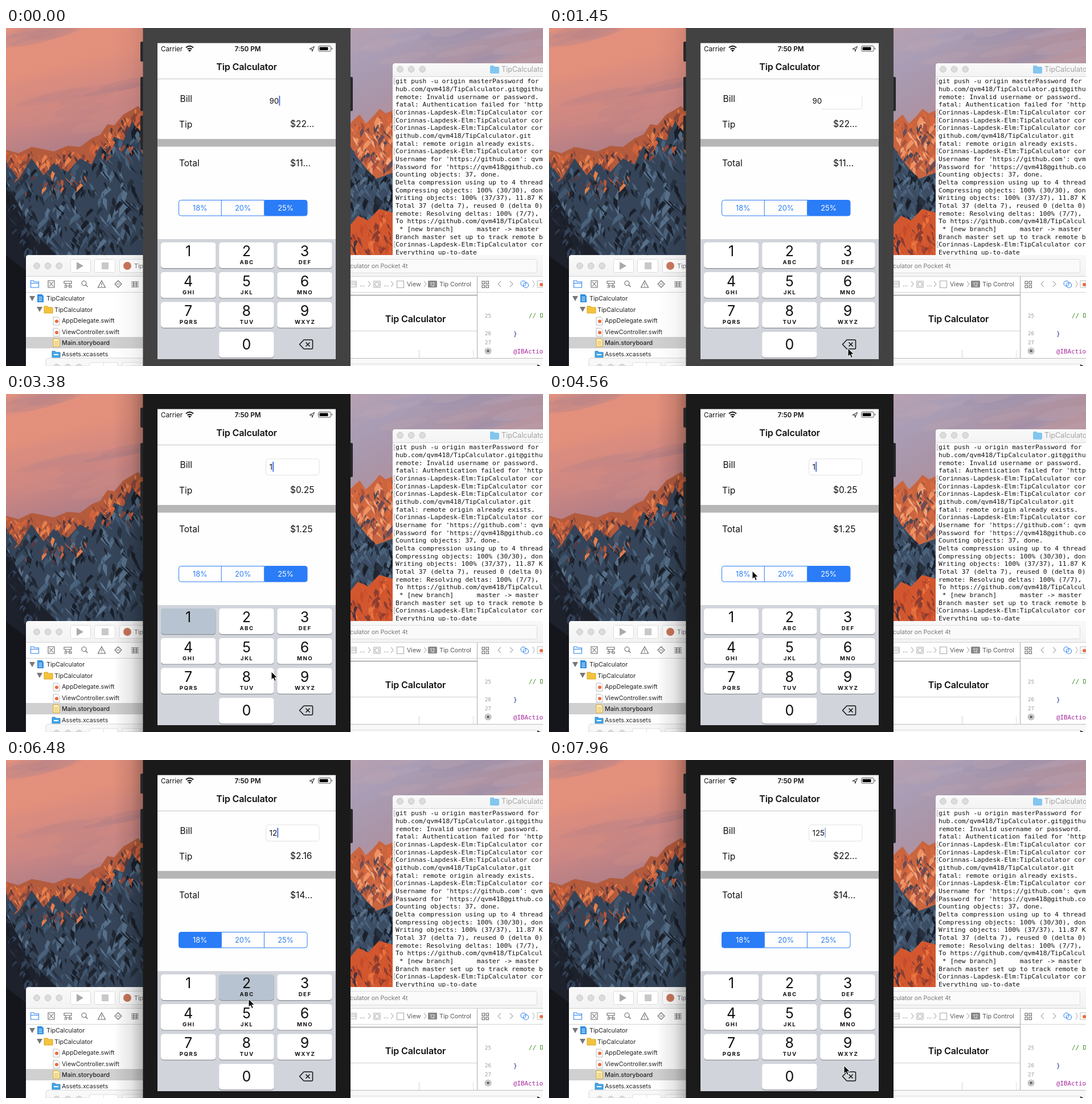
Animation, 943 px wide and 594 px high, one loop 8000 ms. Source, as an HTML page with a canvas:

```html
<!DOCTYPE html>
<html lang="en">
<head>
<meta charset="utf-8">
<title>Tip Calculator</title>
<style>
  html, body { margin: 0; width: 100%; height: 100%; overflow: hidden; background: #1c1e27; }
  canvas, svg { position: absolute; left: 0; top: 0; width: 943px; height: 594px; }
  text { font-family: Inter, "Open Sans", sans-serif; font-size: 15.5px; fill: #111; white-space: pre; }
  .mono { font-family: "DejaVu Sans Mono", monospace; font-size: 11.3px; }
  .code { font-size: 10.8px; }
  .ui { font-size: 10.7px; fill: #222; }
  .dim { fill: #777; }
  .mid { text-anchor: middle; }
  .title { font-size: 16px; font-weight: 600; letter-spacing: -.1px; }
  .status { font-size: 11.7px; }
  .field { font-size: 13.3px; }
  .digit { font-size: 25px; }
  .abc { font-size: 9.6px; font-weight: 700; letter-spacing: 1.5px; }
  .pct { font-size: 12.7px; fill: #2a7cf7; }
  .line { fill: none; stroke: #666; stroke-width: 1.1; }
  .box { fill: #fff; stroke: #dcdcdc; }
  .key { fill: #fff; }
  .key.down { fill: #b7c3d0; }
  .on rect { fill: #2a7cf7; }
  .on text { fill: #fff; }
  #del { fill: none; stroke: #111; stroke-width: 1.5; stroke-linejoin: round; }
  #del.down path:first-child { fill: #000; }
  #del.down path:last-child { stroke: #fff; }
</style>
</head>
<body>
<canvas id="wall" width="943" height="594"></canvas>
<svg viewBox="0 0 943 594">
  <defs>
    <linearGradient id="shade"><stop offset="0" stop-opacity="0"/><stop offset=".6" stop-opacity=".1"/><stop offset="1" stop-opacity=".28"/></linearGradient>
    <linearGradient id="bar" x2="0" y2="1"><stop stop-color="#f9f9f9"/><stop offset="1" stop-color="#f3f3f3"/></linearGradient>
    <clipPath id="part"><rect x="479" y="118" width="100" height="40"/></clipPath>
  </defs>

  <!-- terminal -->
  <path d="M679 400V67q0-5 5-5H943V400Z" fill="#fff"/>
  <path d="M679 85V67q0-5 5-5H943V85Z" fill="url(#bar)"/>
  <path d="M679 85.5H943" stroke="#d5d5d5"/>
  <path d="M850 68q0-2 2-2h4l2 2h6q2 0 2 2v8q0 2-2 2h-12q-2 0-2-2Z" fill="#82c6ef"/>
  <text x="870" y="77" style="font-size:12.6px;fill:#a3a3a3">TipCalculator</text>
  <g id="term"></g>

  <!-- editor window -->
  <path d="M35 594V404q0-5 5-5H943V594Z" fill="#fff"/>
  <path d="M35 437V404q0-5 5-5H943V437Z" fill="url(#bar)"/>
  <path d="M35 436.5H943M35 464.5H943" stroke="#d2d2d2"/>
  <g class="box">
    <rect x="113.500" y="406.500" width="35" height="23" rx="3"/>
    <rect x="155.500" y="406.500" width="36" height="23" rx="3"/>
    <rect x="199.500" y="406.500" width="60" height="23" rx="3"/>
    <rect x="560.500" y="406.500" width="372" height="24" rx="3" fill="#fafafa"/>
  </g>
  <path d="M124 411l12 7-12 7Z" fill="#aaa"/>
  <rect x="168" y="412" width="12" height="12" fill="#c8c8c8"/>
  <circle cx="213" cy="418" r="7" fill="#c9775a"/>
  <text class="ui dim" x="225" y="422">Tip</text>
  <text class="ui dim" x="604" y="422">culator on Pocket 4t</text>

  <!-- navigator icons -->
  <path class="line" style="stroke:#2b82f0" d="M43.500 446v10h14v-10h-8l-1-2h-5Zm0 2.500h14"/>
  <path class="line" d="M74 444h11v12H74ZM76 446l7 8m0-8-7 8M102 445h13v4h-13Zm0 8h4v3h-4m9-3h4v3h-4Zm-6-4v4h7v-4M143.500 455l-4-4M168 444l6.500 12h-13Zm0 4v4m0 1v1.500M197 444l6 6-6 6-6-6Zm-3 6h6M220 446h13m-13 3h13m-13 3h13m-13 3h13m-9-9v9m5-9v9"/>
  <circle class="line" cx="137" cy="448.500" r="4"/>

  <!-- file list -->
  <rect x="35" y="543" width="206" height="20" fill="#d0d0d0"/>
  <path d="M41 471h10l-5 9ZM54 490h10l-5 9Z" fill="#777"/>
  <path d="M55 468h8l3 3v11H55Z" fill="#2e8fe4"/><path d="M57.500 473h6m-6 3h6m-6 3h6" stroke="#fff"/>
  <path d="M67 489h6l1 2h8v10H67Z" fill="#f4c33d" stroke="#d9a41f"/>
  <g id="files"></g>
  <path d="M83 546h8l3 3v11H83Z" fill="#fff3c4" stroke="#d9a41f"/><path d="M85 551h7m-7 3h7m-7 3h7" stroke="#d9a41f"/>
  <path d="M81 568h5l1 2h8v9H81Z" fill="#45a6e8" stroke="#2b86c9"/><path d="M84 574h8" stroke="#fff" stroke-width="2"/>

  <!-- jump bar, canvas and code -->
  <path class="line" style="stroke:#aaa" d="M604 445h11v10h-11m0-7h11m-11 3h11M636 445l4 5-4 5M646 445h11v11h-11ZM676 445l4 5-4 5M686.500 444.500h12v12h-12ZM734 445l4 5-4 5M869 445l-5 5 5 5M885 445l5 5-5 5"/>
  <circle class="line" cx="651.500" cy="450.500" r="3.500" style="stroke:#aaa"/>
  <rect x="741" y="444" width="16" height="12" rx="1.500" fill="#888"/>
  <text class="mid" x="749" y="453.500" style="font-size:9px;fill:#fff">12</text>
  <text class="ui dim" x="621" y="454">...</text>
  <text class="ui dim" x="663" y="454">...</text>
  <text class="ui" x="704" y="454" style="fill:#555">View</text>
  <text class="ui" x="761" y="454" style="fill:#555">Tip Control</text>
  <path class="line" d="M836 445h4.500v4.500H836Zm7 0h4.500v4.500H843Zm-7 7h4.500v4.500H836Zm7 0h4.500v4.500H843Z"/>
  <g class="line" style="stroke:#2b82f0"><circle cx="908.500" cy="449" r="4.500"/><circle cx="913" cy="452" r="4.500"/></g>
  <path class="line" d="M925 444l3 6-3 6" style="stroke:#bbb"/>
  <path d="M933 444h10v12H933Z" fill="#fff" stroke="#bbb"/><circle cx="940" cy="451" r="3" fill="#ec6a3c"/>
  <path d="M605 469.500H827" stroke="#777"/><path d="M605 532.500H827M725.500 566v14" stroke="#cfcfcf"/>
  <path d="M827.500 437V580" stroke="#aaa"/><path d="M820.500 566v14" stroke="#ddd"/>
  <text class="title mid" x="719" y="516.500">Tip Calculator</text>
  <g class="mid" id="nums"></g>
  <circle class="line" cx="846.500" cy="567.500" r="5" style="stroke:#888"/><circle cx="846.500" cy="567.500" r="3" fill="#777"/>
  <text class="mono code" x="918" y="509" style="fill:#3f8f22">// Do any</text>
  <text class="mono code" x="891" y="540.500" style="fill:#1c2c9c">}</text>
  <text class="mono code" x="891" y="571.500" style="fill:#a5279b">@IBAction</text>
  <path d="M605 580H943V594H605Z" fill="#f8f8f8"/><path d="M605 580.500H943" stroke="#bbb"/>
  <path d="M605 590.500H930q4 0 4 4" class="line" style="stroke:#ddd"/>
  <path d="M933 591l6 3h-6Z" fill="#333"/>
  <path d="M70 594V585q0-5 5-5H241V594Z" fill="#f8f8f8" stroke="#d5d5d5"/>
  <path class="box" d="M146.500 594v-4q0-2 2-2h46q2 0 2 2v4M171.500 588v6M204.500 594v-4q0-2 2-2h40"/>
  <g id="lights"></g>

  <!-- simulator -->
  <rect id="shadow" x="189" width="52" height="594" fill="url(#shade)"/>
  <path d="M241 24h-3q-2 0-2 2v31q0 2 2 2h3ZM241 86h-3q-2 0-2 2v56q0 2 2 2h3ZM241 154h-3q-2 0-2 2v56q0 2 2 2h3ZM604 86h3q2 0 2 2v56q0 2-2 2h-3Z" fill="#26272b"/>
  <rect id="bezel" x="240.500" width="364.500" height="594"/>
  <rect x="266" y="26.500" width="313" height="555.500" fill="#fefefe"/>
  <text class="status" x="272" y="41">Carrier</text>
  <g fill="none" stroke="#111" stroke-width="2"><path d="M316 34.500q6.500-5.500 13 0M318.600 37.300q3.900-3.200 7.800 0"/></g>
  <path d="M319.800 39.200q2.700-1.800 5.400 0l-2.700 2.600Z" fill="#111"/>
  <text class="status mid" x="424.500" y="41" font-weight="600">7:50 PM</text>
  <path d="M533 37l8.500-4.500-4 8.800v-4.300Z" fill="none" stroke="#222"/>
  <rect x="548.500" y="31.500" width="22" height="9.500" rx="2.500" fill="none" stroke="#555"/>
  <rect x="550.500" y="33.500" width="15" height="5.500" rx="1"/><path d="M572 34.500q2 1.700 0 3.500Z"/>
  <text class="title mid" x="422.500" y="73.500">Tip Calculator</text>
  <path d="M266 89.500H579" stroke="#c4c4c6"/>
  <text x="305.500" y="130">Bill</text>
  <text x="304" y="174.500">Tip</text>
  <text x="304" y="243">Total</text>
  <rect id="field" x="456.500" y="114" width="93.500" height="28.500" rx="4.500" fill="#fff" stroke="#e1e1e1"/>
  <text class="field" id="bill" x="462.500" y="132.500"></text>
  <rect id="caret" y="119" width="1.800" height="17.500" fill="#4568e0"/>
  <text id="tip" x="499" y="174"></text>
  <text id="total" x="499" y="242.500"></text>
  <rect x="266" y="195" width="313" height="13.500" fill="#b6b6b6"/>
  <g id="segs"></g>
  <rect x="303.500" y="302.500" width="225.500" height="27.500" rx="4" fill="none" stroke="#2a7cf7"/>
  <rect x="266" y="371" width="313" height="211" fill="#d1d4da"/>
  <g id="keys"></g>
  <g id="del"><path d="M515.500 556l7-7.500q.5-.5 1.500-.5h12.500q2 0 2 2v12q0 2-2 2H524q-1 0-1.500-.5Z"/><path d="M526.500 552.500l7 7m0-7-7 7"/></g>
  <path id="arrow" d="M0 0V14.300L3.300 11.300 5.700 16.600 8.200 15.500 5.800 10.300H10.300Z" stroke="#fff"/>
</svg>

<script>
const $ = id => document.getElementById(id);
const fill = (id, items, draw) => { $(id).innerHTML = items.map(draw).join(''); };

// --- static repeats ---
const prompt = '[Corinnas-Lapdesk-Elm:TipCalculator corin';
fill('term', [
  '[git push -u origin masterPassword for', 'hub.com/qvm418/TipCalculator.git@github',
  'remote: Invalid username or password.', "fatal: Authentication failed for 'https", prompt, prompt, prompt,
  'github.com/qvm418/TipCalculator.git', 'fatal: remote origin already exists.', prompt,
  "Username for 'https://github.com': qvm418", "[Password for 'https://qvm418@github.com",
  'Counting objects: 37, done.', 'Delta compression using up to 4 threads',
  'Compressing objects: 100% (30/30), done', 'Writing objects: 100% (37/37), 11.87 Ki',
  'Total 37 (delta 7), reused 0 (delta 0)', 'remote: Resolving deltas: 100% (7/7), d',
  'To https://github.com/qvm418/TipCalculat', ' * [new branch]      master -> master',
  'Branch master set up to track remote br', prompt, 'Everything up-to-date'
], (s, i) => {
  const y = 97.3 + i * 13.66, marked = s[0] === '[';
  const mark = marked ? `<path class="line" style="stroke:#aaa" d="M683.500 ${y - 8.500}h-2v10h2"/>` : '';
  return mark + `<text class="mono" x="684" y="${y}">${marked ? s.slice(1) : s}</text>`;
});

fill('files', [
  [71, 'TipCalculator'], [85, 'TipCalculator'], [98, 'AppDelegate.swift'],
  [98, 'ViewController.swift'], [98, 'Main.storyboard'], [98, 'Assets.xcassets']
], ([x, s], i) => {
  const y = 479 + i * 19.55;
  const doc = s.endsWith('.swift')
    ? `<path d="M83 ${y - 10}h8l3 3v11H83Z" fill="#fff" stroke="#bbb"/><circle cx="89" cy="${y - 2.5}" r="3" fill="#ec6a3c"/>` : '';
  return doc + `<text class="ui" x="${x}" y="${y}" ${i === 4 ? 'font-weight="500"' : ''}>${s}</text>`;
});

fill('nums', [[25, 509], [26, 540], [27, 556]], ([n, y]) =>
  `<text class="mono" style="font-size:9px;fill:#999" x="846.500" y="${y}">${n}</text>`);

fill('lights', [[692, 72.5], [54, 418], [89, 596]], ([x, y]) => [0, 1, 2].map(i =>
  `<circle cx="${x + i * 19.6}" cy="${y}" r="5.300" fill="#dcdcdc" stroke="#c4c4c4"/>`).join(''));

fill('segs', [18, 20, 25], (p, i) => {
  const x = 303.5 + i * 75.2;
  return `<g data-rate="${p}"><rect x="${x}" y="302.500" width="75" height="27.500" rx="3" fill="none"/>` +
    (i ? `<path d="M${x - .5} 303v27" stroke="#2a7cf7"/>` : '') +
    `<text class="pct mid" x="${x + 37.3}" y="321">${p}%</text></g>`;
});

fill('keys', ['1', '2ABC', '3DEF', '4GHI', '5JKL', '6MNO', '7PQRS', '8TUV', '9WXYZ', '', '0'], (s, i) => {
  if (!s) return '';
  const x = 272 + i % 3 * 102.1, y = 376.7 + Math.floor(i / 3) * 52.4, cx = x + 48.2;
  const rect = (dy, more) => `<rect x="${x}" y="${y + dy}" width="96.500" height="45.300" rx="5" ${more}/>`;
  return rect(1.2, 'fill="#8b8e93"') + rect(0, `class="key" data-key="${s[0]}"`) +
    `<text class="digit mid" x="${cx}" y="${y + (s === '0' ? 31.5 : 24.5)}">${s[0]}</text>` +
    `<text class="abc mid" x="${cx + .7}" y="${y + 38.4}">${s.slice(1)}</text>`;
});

// --- wallpaper ---
const g = $('wall').getContext('2d');
let seed = 7;
const rnd = () => (seed = seed * 16807 % 2147483647) / 2147483647;
const pick = list => list[Math.floor(rnd() * list.length)];

function poly(points, color) {
  g.fillStyle = color;
  g.beginPath();
  points.forEach(p => g.lineTo(...p));
  g.fill();
}
function sky(x, w, x2, y2, colors) {
  const grad = g.createLinearGradient(x, 0, x2, y2);
  colors.forEach((c, i) => grad.addColorStop(i / (colors.length - 1), c));
  g.fillStyle = grad;
  g.fillRect(x, 0, w, 594);
}
// Soft flat cloud banks
function clouds(n, x, y, w, h, colors) {
  g.globalAlpha = .3;
  for (let i = 0; i < n; i++) {
    g.fillStyle = pick(colors);
    g.beginPath();
    g.ellipse(x + rnd() * w, y + rnd() * h, 30 + rnd() * 60, 4 + rnd() * 9, -.2, 0, 7);
    g.fill();
  }
  g.globalAlpha = 1;
}
function heightAt(line, x) {
  const i = Math.max(1, line.findIndex(p => p[0] >= x));
  const [a, b] = [line[i - 1], line[i]];
  return a[1] + (b[1] - a[1]) * (x - a[0]) / (b[0] - a[0]);
}
// Slanted slivers of rock and snow, hanging below a ridge line
function shards(n, line, from, to, size, colors) {
  const x0 = line[0][0], w = line[line.length - 1][0] - x0;
  for (let i = 0; i < n; i++) {
    const x = x0 + rnd() * w, y = heightAt(line, x) + from + rnd() * (to - from);
    const s = size * (.4 + rnd()), lean = (rnd() - .35) * s * 2.2;
    poly([[x, y], [x + s * .35, y + s * .3], [x + lean, y + s * 1.3], [x + lean * .5 - s * .2, y + s * .6]], pick(colors));
  }
}
const drop = (line, base) => [...line, [line[line.length - 1][0], base], [line[0][0], base]];
const sunlit = ['#e57f4c', '#d2633c', '#8c483b', '#573b40', '#b5563a'];
const snow = ['#57708a', '#4a627c', '#3f566e', '#27313f', '#1f2631', '#1a1f29'];

sky(0, 300, 60, 250, ['#e3917e', '#e28f7c', '#cb8683', '#a67b88']);
clouds(6, -20, 0, 110, 26, ['#a97f85', '#b98488']);
clouds(12, 0, 95, 240, 80, ['#b98084', '#d08a80', '#a87c86']);
sky(600, 343, 700, 170, ['#b9a1b0', '#a99db5', '#aa95a8', '#b38f9a']);
clouds(14, 620, 0, 320, 60, ['#9a90ab', '#b5a6bb', '#bda2ad']);

const left = [[0, 214], [22, 220], [45, 209], [66, 213], [84, 217], [108, 207], [130, 209], [150, 194], [166, 187], [178, 169], [190, 171], [206, 152], [222, 143], [232, 137], [246, 152]];
poly(drop(left, 594), '#b45b3d');
shards(130, left, 2, 34, 14, sunlit);
const shade = left.map(([x, y], i) => [x, y + (i % 2 ? 46 : 20)]);
poly(drop(shade, 594), '#354458');
shards(380, shade, 0, 190, 15, snow);
shards(60, left, 6, 75, 11, sunlit);
poly([[0, 270], [24, 315], [50, 360], [90, 400], [90, 594], [0, 594]], '#1d212b');
shards(60, [[0, 270], [60, 370]], 0, 60, 12, ['#2d394a', '#181c26', '#33425a', '#1f2430']);
poly([[0, 400], [40, 430], [40, 594], [0, 594]], '#15161c');

const right = [[600, 172], [612, 160], [621, 152], [632, 168], [646, 154], [656, 142], [667, 150], [685, 142]];
poly(drop(right, 594), '#c9653f');
shards(130, right, 2, 95, 13, ['#ee9265', '#d9683f', '#a8533f', '#f0a57c', '#6d4b55', '#4a4656']);
const gully = [[600, 200], [615, 225], [632, 246], [650, 265], [685, 252]];
poly(drop(gully, 594), '#3c4c62');
shards(130, gully, 0, 100, 13, snow);
const foot = [[600, 352], [618, 330], [636, 338], [655, 318], [685, 326]];
poly(drop(foot, 594), '#d2572f');
shards(60, foot, 2, 70, 12, ['#e8743f', '#8d3d30', '#c44b2b', '#4a3440']);

const LOOP = 8000, BEAT = 147.4;
const bills = [[0, '90'], [10, '9'], [13, ''], [21, '1'], [44, '12'], [47, '125']];
const rates = [[0, 25], [33, 18]];
const pressed = [[0, ''], [10, 'del'], [17, ''], [21, '1'], [24, ''], [44, '2'], [45, ''], [47, '5'], [51, '']];
const carets = [[0, 1], [2, 0], [10, 1], [18, 0], [21, 1], [25, 0], [28, 1], [32, 0], [36, 1], [38, 0], [41, 1], [51, 0], [54, .5]];
const path = [
  [2, 567, 470], [3, 556, 497], [5, 534, 532], [6, 528, 538], [7, 528, 538], [8, 526, 552], [9, 525, 563], [13, 525, 562],
  [14, 450, 512], [15, 325, 430], [16, 242, 386], [17, 262, 390], [19, 325, 404], [20, 325, 404], [21, 332, 410],
  [23, 466, 488], [24, 497, 530], [26, 503, 560], [28, 470, 540], [29, 446, 512], [31, 357, 311], [32, 340, 309],
  [36, 325, 311], [37, 325, 311], [39, 358, 362], [42, 420, 410], [43, 420, 410], [44, 426, 420], [46, 428, 448],
  [48, 426, 454], [50, 426, 454], [52, 465, 497], [54, 518, 537]
];

const last = (list, n) => list.filter(e => e[0] <= n).pop();
const state = (list, n) => last(list, n)[1];
function money(v) {
  const s = '$' + v.toFixed(2);
  return s.length > 5 ? s.slice(0, 3) + '...' : s;
}
function pointer(n) {
  const a = last(path, n);
  if (!a) return null;
  const b = path.find(p => p[0] > n) || a;
  const k = a === b ? 0 : (n - a[0]) / (b[0] - a[0]);
  return [1, 2].map(i => Math.round(a[i] + (b[i] - a[i]) * k));
}

function render(n) {
  const bill = state(bills, n), rate = state(rates, n), key = state(pressed, n), active = n >= 10;
  $('bill').textContent = bill;
  $('tip').textContent = money(bill * rate / 100);
  $('total').textContent = money(bill * (1 + rate / 100));
  $('caret').setAttribute('x', 462.8 + (bill ? $('bill').getComputedTextLength() : 0));
  $('caret').setAttribute('opacity', state(carets, n));
  document.querySelectorAll('[data-rate]').forEach(e => e.classList.toggle('on', +e.dataset.rate === rate));
  document.querySelectorAll('[data-key]').forEach(e => e.classList.toggle('down', e.dataset.key === key));
  $('del').classList.toggle('down', key === 'del');

  $('bezel').setAttribute('fill', active ? '#1a1a1a' : '#424242');
  $('shadow').setAttribute('opacity', active ? 1 : .3);
  $('field').style.display = n < 2 ? 'none' : '';
  $('field').style.clipPath = active ? 'none' : 'url(#part)';

  const at = pointer(n);
  $('arrow').style.display = at ? '' : 'none';
  if (at) $('arrow').setAttribute('transform', `translate(${at})`);
}

let shown = -1;
function loop() {
  const n = Math.floor((performance.now() % LOOP + 20) / BEAT);
  if (n !== shown) render(shown = n);
  requestAnimationFrame(loop);
}
loop();
</script>
</body>
</html>
```
